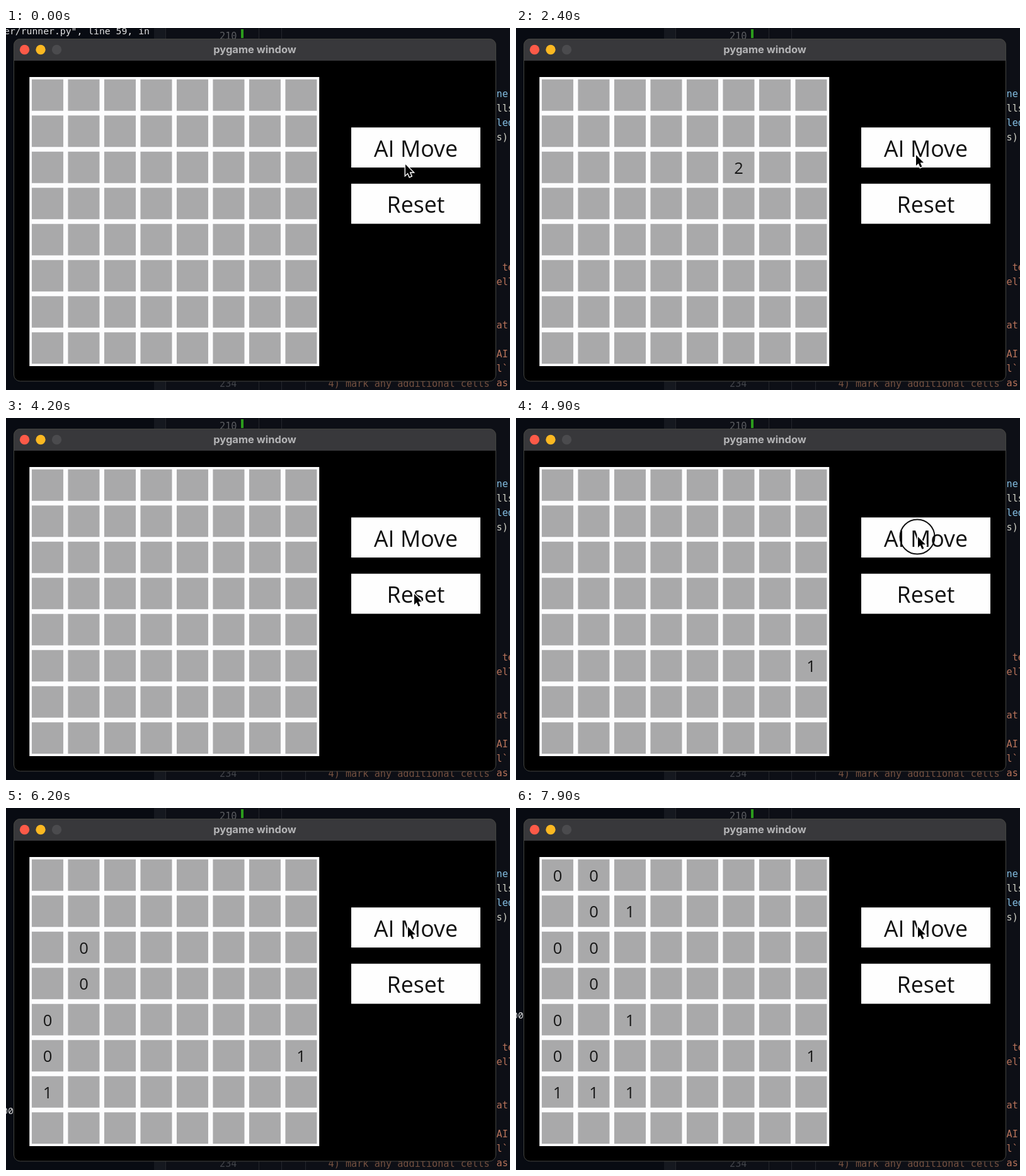
Animation of 800 by 576 pixels, one loop 8 s. Source, as an HTML page:

```html
<!DOCTYPE html>
<html lang="en">
<head>
<meta charset="utf-8">
<title>Minesweeper</title>
<style>
  html, body { margin: 0; width: 100%; height: 100%; overflow: hidden; background: #000; }
  svg { display: block; width: 800px; height: 576px; }
  text { white-space: pre; }
  .code { font: 15.2px "DejaVu Sans Mono", monospace; }
  .title { font: 700 16.5px Inter, sans-serif; fill: #b4b4b6; }
  .label { font: 35.75px "Open Sans", sans-serif; fill: #111; }
  .digit { font: 25.5px "Open Sans", sans-serif; fill: #161616; }
  .mid { text-anchor: middle; }
</style>
</head>
<body>
<svg viewBox="0 0 800 576">
  <defs>
    <g id="mine" stroke="#000" stroke-width="2.6">
      <path d="M-20 0H20M0-20V20M-13-13L13 13M-13 13L13-13"/>
      <circle r="12.2"/>
    </g>
  </defs>

  <!-- editor behind the window -->
  <rect width="800" height="576" fill="#080b12"/>
  <rect x="235" width="18" height="576" fill="#15181f"/>
  <rect x="254" width="546" height="576" fill="#0d0f16"/>
  <path d="M253.5 0V576M401.5 0V576M437.5 0V576M475.5 562V576" stroke="#24262c"/>
  <g id="code" class="code">
    <text id="trace" x="-3" y="10" font-size="14.75" fill="#e2e2e2">er/runner.py", line 59, in</text>
    <text x="339" y="18" fill="#5c5e62">210</text>
    <text x="339" y="571" fill="#42444a">234</text>
    <text x="511.5" y="570.5" fill="#74503f">4) mark any additional cells</text>
  </g>
  <rect x="373" y="2" width="4" height="14" fill="#2c9c1c"/>
  <text id="log" x="-6" font-family="Noto Sans Mono, monospace" font-size="15" fill="#dcdcdc">00</text>

  <!-- window -->
  <rect x="12" y="17" width="766" height="545" rx="10"/>
  <path d="M12 52V27a10 10 0 0 1 10-10H768a10 10 0 0 1 10 10V52Z" fill="#38383b"/>
  <rect x="12.5" y="17.5" width="765" height="544.5" rx="10" fill="none" stroke="#444540"/>
  <circle cx="29.5" cy="34.5" r="7.7" fill="#fd5a48"/>
  <circle cx="55" cy="34.5" r="7.7" fill="#fbb822"/>
  <circle cx="80.500" cy="34.5" r="7.7" fill="#4b4b4e"/>
  <text class="title mid" x="395" y="39.5">pygame window</text>

  <rect x="37.2" y="78" width="460" height="460" fill="#fcfcfd"/>
  <g id="board"></g>

  <path d="M548 158.3H753V222H548ZM548 247.8H753V311.5H548Z" fill="#fefefe"/>
  <g class="label mid">
    <text x="650.5" y="204.6">AI Move</text>
    <text x="650.5" y="294.2">Reset</text>
    <text id="lost" x="651" y="408" fill="#f4f4f4">Lost</text>
  </g>

  <circle id="ring" r="27.5" fill="none" stroke="#111" stroke-width="2"/>
  <path id="cursor" d="M0 0V17L3.8 13.400L6.600 19.800L9.400 18.600L6.700 12.300H12Z" stroke="#fff" stroke-width="2.8" paint-order="stroke"/>
</svg>
<script>
const LOOP = 8000, TICK = 100, SIZE = 8, PITCH = 57.5;
const RESET = 4100, LAST = 13;
const $ = id => document.getElementById(id);

function add(parent, tag, attrs, text = '') {
  const el = document.createElementNS('http://www.w3.org/2000/svg', tag);
  for (const k in attrs) el.setAttribute(k, attrs[k]);
  el.textContent = text;
  return parent.appendChild(el);
}
const show = (el, on) => el.setAttribute('visibility', on ? 'visible' : 'hidden');
const mid = (start, i) => start + (i + 0.5) * PITCH;

// line ends showing right of the window
'ne,lls,led,s),,,,,,,,, te,ell,,,at,,AI,l`,as'.split(',').forEach((text, i) => {
  const fill = i > 3 ? '#b8735a' : i % 2 ? '#cfd0c4' : '#84bfe4';
  add($('code'), 'text', { x: 778.5, y: 110 + 23 * i, fill }, text);
});

// cells are written as row and column, "57" is row 5, column 7
const cells = list => list.split(' ').map(s => [+s[0], +s[1]]);
const board = $('board');
for (let i = 0; i < SIZE * SIZE; i++)
  add(board, 'rect', { x: mid(37.2, i % SIZE) - 25, y: mid(78, i / SIZE | 0) - 25, width: 50, height: 50, fill: '#a9a9aa' });

const games = [
  { mines: '05 07 26 33 36 37 47 56', moves: '25 17', start: 2000, step: 600, end: RESET },
  { mines: '13 43 46 71', moves: '57 31 40 50 21 60 20 61 11 01 00 12 62 42 51', start: 4900, step: 230, end: LOOP }
];
const parts = [{ el: $('trace'), from: 0, to: games[0].start }];
const clicks = [RESET];

for (const { mines, moves, start, step, end } of games) {
  const bombs = cells(mines);
  cells(moves).forEach(([r, c], i) => {
    const near = bombs.filter(([y, x]) => Math.abs(y - r) < 2 && Math.abs(x - c) < 2).length;
    const from = start + step * Math.min(i, LAST);
    const el = add(board, 'text', { class: 'digit mid', x: mid(37.2, c), y: mid(78, r) + 9.9 }, near);
    parts.push({ el, from, to: end });
    if (i < LAST) clicks.push(from);
  });
}

// the third move of the first game hits a mine
const [first, second] = games;
const lost = first.start + 2 * first.step;
clicks.push(lost);
parts.push({ el: $('lost'), from: lost, to: RESET });
for (const [r, c] of cells(first.mines)) {
  const transform = `translate(${mid(37.2, c)} ${mid(78, r) - 2})`;
  parts.push({ el: add(board, 'use', { href: '#mine', transform }), from: lost, to: RESET });
}

// pointer stops and the moves between them: [begin, end, x, y]
const stops = [[0, 0, 634, 217], [0, 400, 635, 202], [3500, 3950, 648, 280], [4200, 4700, 638, 189]];
function pointer(t) {
  return stops.reduce(([x, y], [a, b, nx, ny]) => {
    const k = b ? Math.min(1, Math.max(0, (t - a) / (b - a))) : 1;
    const e = k * k * (3 - 2 * k);
    return [x + (nx - x) * e, y + (ny - y) * e];
  }, [0, 0]);
}

function draw(t) {
  for (const { el, from, to } of parts) show(el, t >= from && t < to);
  const [x, y] = pointer(t);
  const ring = $('ring');
  $('cursor').setAttribute('transform', `translate(${x} ${y})`);
  ring.setAttribute('transform', `translate(${x - 1} ${y})`);
  show(ring, clicks.some(c => t >= c && t < c + TICK));

  // each move prints one line, so the terminal scrolls a tick later
  const lines = Math.floor((t - second.start - TICK) / second.step);
  $('log').setAttribute('y', 595 - 21.7 * lines);
}

let begin;
function loop(now) {
  begin ??= now;
  draw(Math.floor((now - begin) % LOOP / TICK) * TICK);
  requestAnimationFrame(loop);
}
draw(0);
requestAnimationFrame(loop);
</script>
</body>
</html>
```
